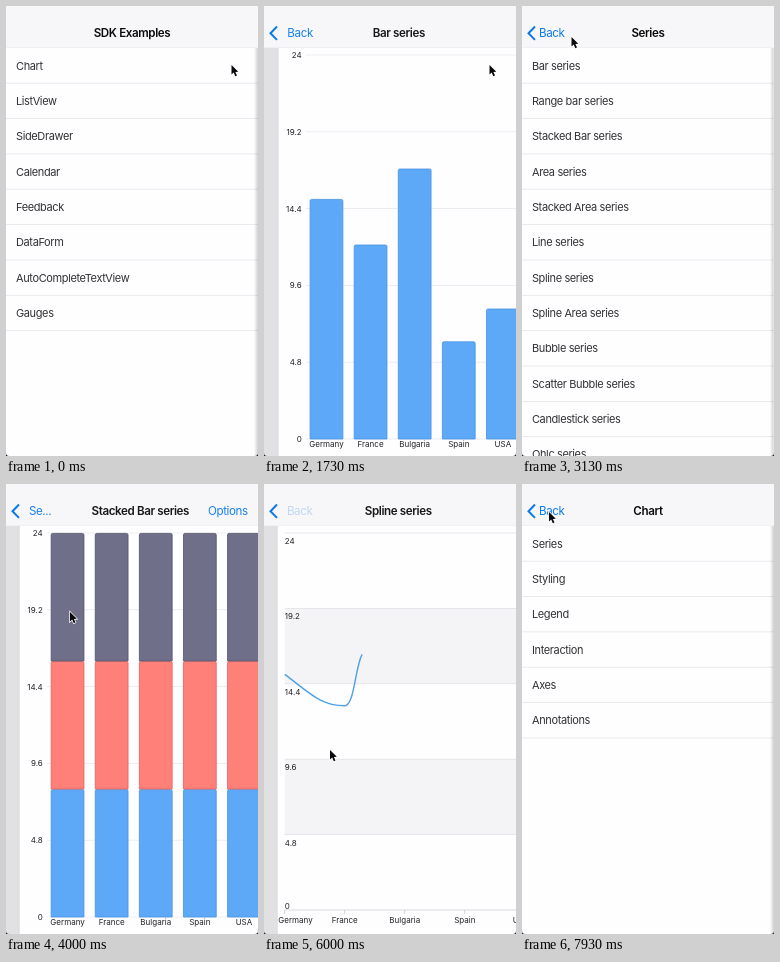
Animation of 252 by 450 pixels, one loop 8 s. Source, as an HTML page with a canvas:

```html
<!DOCTYPE html>
<html lang="en">
<head>
<meta charset="utf-8">
<title>SDK Examples</title>
<style>
html, body { margin: 0; width: 100%; height: 100%; overflow: hidden; background: #fefdff; }
canvas { display: block; width: 252px; height: 450px; }
</style>
</head>
<body>
<canvas id="stage"></canvas>
<script>
const W = 252, H = 450, TOP = 42, LOOP = 8000, SLIDE = 485;
const BLUE = '#0a7aeb', PAPER = '#fefdff';
const COUNTRIES = ['Germany', 'France', 'Bulgaria', 'Spain', 'USA'];
const canvas = document.getElementById('stage');
const ratio = window.devicePixelRatio || 1;
canvas.width = W * ratio;
canvas.height = H * ratio;
const c = canvas.getContext('2d');

const clamp = v => Math.max(0, Math.min(1, v));
const lerp = (a, b, u) => a + (b - a) * u;

function text(str, x, y, { size = 11, weight = 400, color = '#323234', align = 'left', track = -0.38 } = {}) {
  c.font = `${weight} ${size}px Inter, "Open Sans", sans-serif`;
  c.letterSpacing = track + 'px';
  c.textAlign = align;
  c.fillStyle = color;
  c.fillText(str, x, y);
}

function small(str, x, y, align) {
  text(str, x, y, { size: 8, color: '#222', align, track: 0 });
}

function rect(x, y, w, h, color) {
  c.fillStyle = color;
  c.fillRect(x, y, w, h);
}

function list(items) {
  items.forEach((item, i) => {
    const y = 63.5 + 35.35 * i;
    text(item, 10, y);
    rect(0, y + 13.3, W, 0.8, '#e6e5e8');
  });
}

// Each series is one layer of the stack, from the bottom up.
function bars(layers) {
  const unit = 384 / 24;
  for (let i = 0; i <= 5; i++) {
    const y = 433 - 76.8 * i;
    rect(27, y - 0.4, 221, 0.8, '#e9e8eb');
    small(String(+(4.8 * i).toFixed(1)), 23, y + 3, 'right');
  }
  COUNTRIES.forEach((name, i) => {
    const x = 31 + 44.1 * i;
    let base = 433;
    for (const { values, fill, edge } of layers) {
      const h = values[i] * unit;
      c.beginPath();
      c.roundRect(x + 0.4, base - h + 0.4, 32.8, h - 0.4, [1.5, 1.5, 0, 0]);
      c.fillStyle = fill;
      c.fill();
      c.strokeStyle = edge;
      c.lineWidth = 0.8;
      c.stroke();
      base -= h;
    }
    small(name, x + 16.8, 441, 'center');
  });
}

function splineCurve(points, pen) {
  c.beginPath();
  c.moveTo(...points[0]);
  for (let i = 1; i < points.length && pen > i - 1; i++) {
    const f = clamp(pen - i + 1), rise = 1 - (1 - f) ** 5;
    const [x0, y0] = points[i - 1];
    const x1 = lerp(x0, points[i][0], f), y1 = lerp(y0, points[i][1], rise);
    const dx = x1 - x0, dy = y1 - y0;
    const lead = i === 1 ? 0.6 : 0;
    const trail = f < 1 || i === points.length - 1 ? 0.25 : 0;
    c.bezierCurveTo(x0 + dx * lerp(0.42, 0.6, 1 - f), y0 + dy * lead, x1 - dx * 0.4, y1 - dy * trail, x1, y1);
  }
  c.strokeStyle = '#4fa0e6';
  c.lineWidth = 1.4;
  c.stroke();
}

function spline(t) {
  const yOf = v => 426 - 377 * v / 24;
  for (const v of [9.6, 19.2]) rect(7, yOf(v), 245, 75.4, '#f4f3f6');
  for (let i = 0; i <= 5; i++) {
    const v = 4.8 * i, y = yOf(v);
    rect(7, y - 0.4, 245, 0.8, i ? '#e3e2e5' : '#cfced2');
    small(String(+v.toFixed(1)), 7, i ? y + 11 : y - 1);
  }
  COUNTRIES.forEach((name, i) => {
    const x = 7 + 60 * i;
    rect(x - 0.4, 426, 0.8, 4, '#c8c7cb');
    if (i === 0) small(name, 0.5, 439);
    else if (i === 4) small(name, W - 0.5, 439, 'right');
    else small(name, x, 439, 'center');
  });
  splineCurve([15, 13, 17, 6, 8].map((v, i) => [7 + 60 * i, yOf(v)]), (t - 5800) / 156);
}

const blue = values => ({ values, fill: '#5da9f8', edge: '#4794e4' });
const eights = Array(5).fill(8);
const screens = {
  home: {
    title: 'SDK Examples',
    draw: () => list(['Chart', 'ListView', 'SideDrawer', 'Calendar', 'Feedback', 'DataForm', 'AutoCompleteTextView', 'Gauges'])
  },
  chart: {
    title: 'Chart', back: 'Back',
    draw: () => list(['Series', 'Styling', 'Legend', 'Interaction', 'Axes', 'Annotations'])
  },
  series: {
    title: 'Series', back: 'Back',
    draw: () => list(['Bar', 'Range bar', 'Stacked Bar', 'Area', 'Stacked Area', 'Line', 'Spline', 'Spline Area',
      'Bubble', 'Scatter Bubble', 'Candlestick', 'Ohlc'].map(s => s + ' series'))
  },
  bar: {
    title: 'Bar series', back: 'Back',
    draw: () => bars([blue([15, 12.15, 16.9, 6.1, 8.15])])
  },
  stacked: {
    title: 'Stacked Bar series', back: 'Se...', options: true,
    draw: () => bars([
      blue(eights),
      { values: eights, fill: '#ff8079', edge: '#e8605b' },
      { values: eights, fill: '#706f8a', edge: '#545269' }
    ])
  },
  spline: { title: 'Spline series', back: 'Back', lateBack: true, draw: spline }
};

// start time, screen below, screen above, push or pop
const moves = [
  [120, 'home', 'chart', true],
  [799, 'chart', 'series', true],
  [1434, 'series', 'bar', true],
  [2690, 'series', 'bar', false],
  [3700, 'series', 'stacked', true],
  [4830, 'series', 'stacked', false],
  [5700, 'series', 'spline', true],
  [6840, 'series', 'spline', false],
  [7400, 'chart', 'series', false]
];

// time, x, y of the pointer tip
const trail = [
  [0, 225.5, 59], [1950, 225.5, 59], [2550, 38, 28], [2950, 38, 28], [3130, 49.5, 31],
  [3400, 64, 128], [4250, 64, 128], [4700, 15.5, 22], [4950, 15.5, 22],
  [5400, 66, 266], [6300, 66, 266], [6800, 27, 28], [LOOP, 27, 28]
];

function page(screen, x, t, blank) {
  c.save();
  c.translate(x, 0);
  rect(0, TOP, W, H - TOP, PAPER);
  if (!blank) screen.draw(t);
  c.restore();
}

function heading(screen, shift, alpha) {
  c.globalAlpha = alpha;
  text(screen.title, 126 + shift, 31.2, { size: 11.6, weight: 600, color: '#0b0b0c', align: 'center' });
  if (screen.options) text('Options', 202, 31.2, { size: 11.6, color: BLUE });
  c.globalAlpha = 1;
}

function backLabel(screen, shift, alpha) {
  if (!screen.back) return;
  c.globalAlpha = alpha;
  text(screen.back, 17 + shift, 31.2, { size: 11.6, color: BLUE });
  c.globalAlpha = 1;
}

function chevron(alpha) {
  c.globalAlpha = alpha;
  c.beginPath();
  c.moveTo(13, 20.5);
  c.lineTo(6.5, 27.2);
  c.lineTo(13, 33.9);
  c.strokeStyle = BLUE;
  c.lineWidth = 2;
  c.stroke();
  c.globalAlpha = 1;
}

function pointer(t) {
  const i = trail.findIndex(k => k[0] > t);
  const [t0, x0, y0] = trail[i - 1], [t1, x1, y1] = trail[i];
  const u = (t - t0) / (t1 - t0), s = u * u * (3 - 2 * u);
  c.save();
  c.translate(lerp(x0, x1, s), lerp(y0, y1, s));
  c.beginPath();
  [[0, 0], [0, 9.6], [2.2, 7.6], [3.8, 11.2], [5.5, 10.4], [3.9, 7], [6.8, 6.8]].forEach(p => c.lineTo(...p));
  c.closePath();
  c.strokeStyle = '#fff';
  c.lineWidth = 1.4;
  c.stroke();
  c.fillStyle = '#0a0a0a';
  c.fill();
  c.restore();
}

function corners() {
  c.fillStyle = '#111';
  for (const [x, side] of [[0, 1], [W, -1]]) {
    c.beginPath();
    c.moveTo(x, H - 3);
    c.quadraticCurveTo(x, H, x + 3 * side, H);
    c.lineTo(x, H);
    c.fill();
  }
}

function render(t) {
  c.setTransform(ratio, 0, 0, ratio, 0, 0);
  const move = moves.filter(m => m[0] <= t).pop() || [0, 'home', 'chart', false];
  const [start, lowName, highName, push] = move;
  const low = screens[lowName], high = screens[highName];
  const u = start ? clamp((t - start) / SLIDE) : 1;
  const p = 1 - (1 - u) ** 3;
  const cover = push ? p : 1 - p;
  const x = W * (1 - cover);

  if (cover < 1) {
    page(low, -75 * cover, t, push);
    rect(0, TOP, W, H - TOP, `rgba(0,0,0,${0.12 * cover})`);
    const shade = c.createLinearGradient(x - 4, 0, x, 0);
    shade.addColorStop(0, 'rgba(0,0,0,0)');
    shade.addColorStop(1, `rgba(0,0,0,${0.18 * (1 - cover)})`);
    c.fillStyle = shade;
    c.fillRect(x - 4, TOP, 4, H - TOP);
  }
  if (cover > 0) page(high, x, t);

  rect(0, 0, W, TOP, '#f7f6f8');
  rect(0, TOP - 0.5, W, 0.5, '#e8e7ea');
  if (!push) heading(low, -75 * cover, 1 - cover);
  heading(high, x * (0.61 - 0.00069 * x), cover);
  backLabel(low, 0, (1 - cover) ** 2);
  backLabel(high, x * 0.43, high.lateBack ? clamp(cover * 14 - 13) : cover);
  const pressed = t > 4760 && t < 4900;
  chevron(pressed ? 0.3 : low.back ? 1 : cover);

  pointer(t);
  corners();
}

function tick(now) {
  render(now % LOOP);
  requestAnimationFrame(tick);
}
requestAnimationFrame(tick);
</script>
</body>
</html>
```
